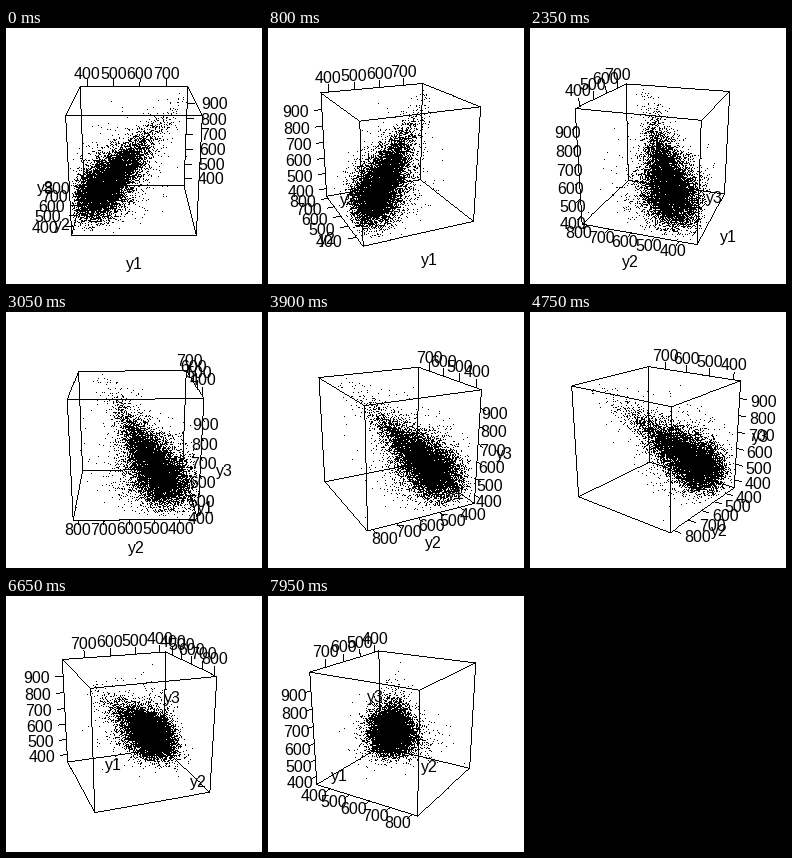
A matplotlib script for the animation above (8 s loop, 256 by 256 pixels).

```python
import numpy as np
import matplotlib.pyplot as plt
from matplotlib.animation import FuncAnimation
from itertools import product

SIZE, DPI = 256, 64
FRAMES, INTERVAL, STEP = 160, 50, 1.5
FOCAL = SIZE / 2 / np.tan(np.radians(15))
DIST = 8.27
COS_E, SIN_E = np.cos(np.radians(20)), np.sin(np.radians(20))
MARK = 2 / 15                      # tick length
TITLE = 1.3                        # title distance from the centre
FONT = 16                          # pixels
LABEL_W = 3 * 0.556 * FONT

# axis: (position of 400, units per step of 100, last tick)
SCALES = [(-0.865, 0.488, 700), (-0.70, 0.402, 800), (-0.84, 0.307, 900)]


def rotate(p, a):
    """Right, up and towards-the-viewer parts of points after the spin."""
    x, y, z = np.asarray(p, float).T
    right = x * np.cos(a) - y * np.sin(a)
    near = -x * np.sin(a) - y * np.cos(a)
    return right, z * COS_E - near * SIN_E, near * COS_E + z * SIN_E


def project(p, a):
    right, up, depth = rotate(p, a)
    k = FOCAL / (DIST - depth)
    return np.column_stack([SIZE / 2 + right * k, SIZE / 2 - up * k])


def make_cloud(n=11000):
    rng = np.random.default_rng(7)
    t = (rng.gamma(3, 1, n) - 3) / 3 ** 0.5
    width = np.clip(np.exp(-0.17 * t), 0.4, 1.25)
    noise = rng.standard_t(6, (n, 3)) * width[:, None]
    p = [-0.43, -0.35, -0.35] + np.outer(t, [0.265, 0.18, 0.25]) + noise * [0.16, 0.185, 0.16]
    return p[(np.abs(p) < 1).all(axis=1)]


def box_edges():
    edges = []
    for axis in range(3):
        for pair in product((-1, 1), repeat=2):
            edges.append([np.insert(pair, axis, end) for end in (-1, 1)])
    return np.array(edges, float)


def axis_layout(i, a):
    """For each axis: a point on the labelled edge and the tick direction."""
    s = 1 if np.sin(a) >= 0 else -1
    c = 1 if np.cos(a) >= 0 else -1
    up = [0, 0, 1]
    x_axis = [0, c, 1], up
    if i == 0 or abs(np.sin(a)) * COS_E > SIN_E:
        y_axis = [-s, 0, -1], [-s, 0, 0]
    else:
        y_axis = [s, 0, 1], up
    side = 1 if i == 0 else -s
    z_axis = [side, c, 0], [side, 0, 0]
    return x_axis, y_axis, z_axis


def ink(canvas, pts):
    x, y = np.floor(pts).astype(int).T
    canvas[y, x] = 0


def ink_line(canvas, p, q):
    n = int(np.ceil(np.abs(q - p).max())) + 1
    ink(canvas, np.linspace(p, q, n))


cloud = make_cloud()
edges = box_edges()
titles = [("y1", (0, -TITLE, -TITLE)), ("y2", (-TITLE, 0, -TITLE)), ("y3", (-TITLE, -TITLE, 0))]

fig = plt.figure(figsize=(SIZE / DPI, SIZE / DPI), dpi=DPI, facecolor="white")
ax = fig.add_axes([0, 0, 1, 1])
ax.axis("off")
image = ax.imshow(np.ones((SIZE, SIZE)), cmap="gray", vmin=0, vmax=1, aspect="auto",
                  interpolation="nearest", extent=(0, SIZE, SIZE, 0))


def new_text(s):
    return ax.text(0, 0, s, family="Liberation Sans", size=FONT * 72 / DPI,
                   ha="center", va="baseline")


def place(text, x, y):
    text.set_position((x, y + 0.37 * FONT))


title_texts = [new_text(s) for s, _ in titles]
tick_texts = [[new_text(str(v)) for v in range(400, last + 1, 100)] for _, _, last in SCALES]


def draw(i):
    a = np.radians(STEP * i)
    canvas = np.ones((SIZE, SIZE))
    ink(canvas, project(cloud, a))
    for edge in edges:
        ink_line(canvas, *project(edge, a))

    for axis, (base, way) in enumerate(axis_layout(i, a)):
        start, step, _ = SCALES[axis]
        way = np.array(way, float)
        ex, ey, _ = np.abs(rotate([way], a)).ravel()
        shift = 0
        if ex > ey:
            shift = np.sign(rotate([way], a)[0][0]) * (ex - ey) / ex * LABEL_W / 2
        for n, text in enumerate(tick_texts[axis]):
            p = np.array(base, float)
            p[axis] = start + n * step
            root, tip, spot = project([p, p + way * MARK, p + way * 2 * MARK], a)
            ink_line(canvas, root, tip)
            place(text, spot[0] + shift, spot[1])

    image.set_data(canvas)
    for text, (_, p) in zip(title_texts, titles):
        x, y = project([p], a)[0]
        place(text, x, y + 1)
    return [image]


anim = FuncAnimation(fig, draw, frames=FRAMES, interval=INTERVAL, repeat=True, repeat_delay=0)
plt.show()
```
